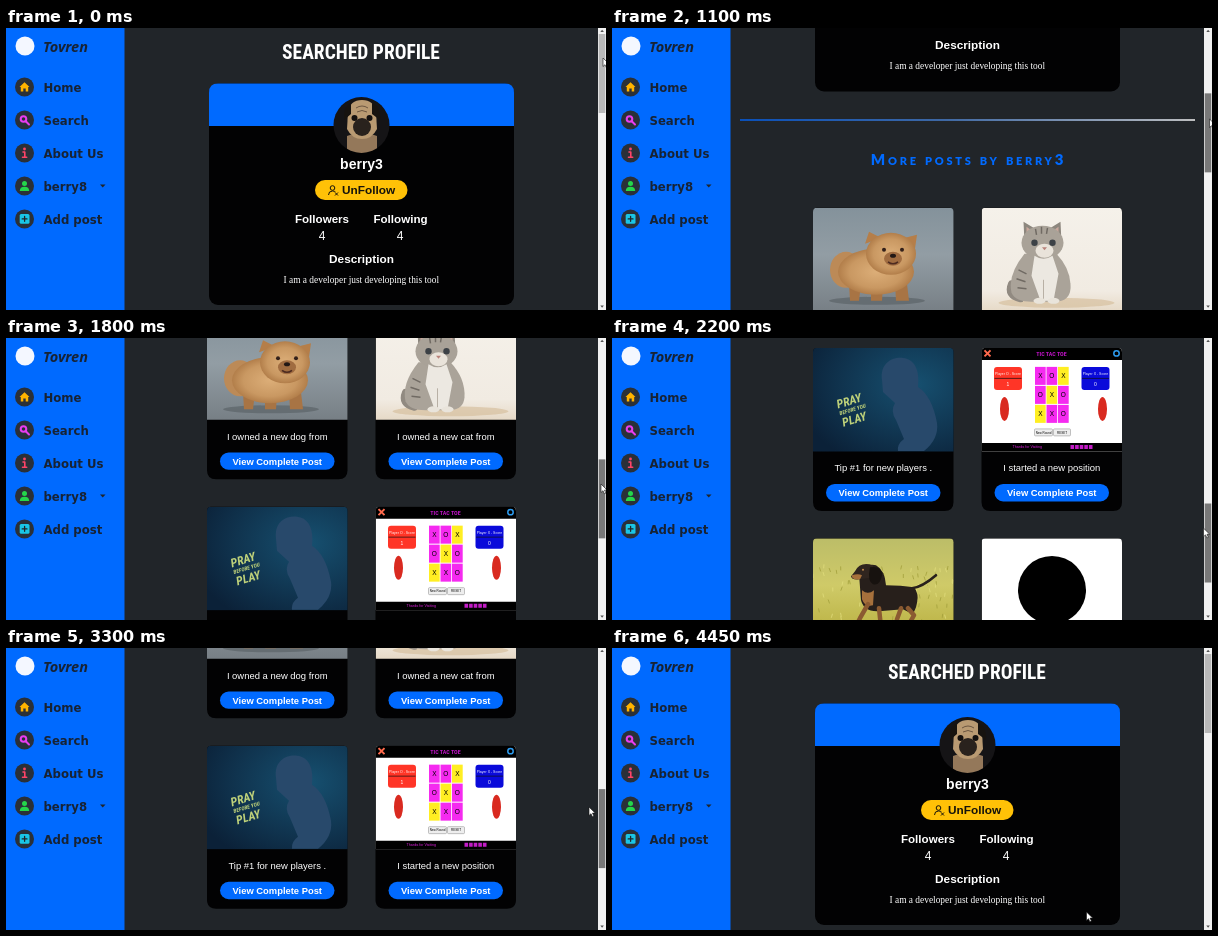
Write an HTML page that moves like this. It is 600x282 px and loops after 4.5 s.

```html
<!DOCTYPE html>
<html lang="en">
<head>
<meta charset="utf-8">
<title>Searched profile</title>
<style>
html, body { margin: 0; width: 100%; height: 100%; overflow: hidden; background: #212529; }
svg { display: block; width: 100%; height: 100%; }
text { font-family: "Liberation Sans", Arial, sans-serif; }
.mid { text-anchor: middle; }
.b { font-weight: 700; }
.brand { font: italic 700 14.5px "Open Sans", sans-serif; }
.nav { font: 700 11.7px "DejaVu Sans", Verdana, sans-serif; }
.title { font: 700 19.5px "Roboto Condensed", "Open Sans Condensed", Roboto, sans-serif; font-stretch: 75%; }
.bio { font: 9.4px "Liberation Serif", Times, serif; }
.more { font: 900 15px Lato, sans-serif; font-variant: small-caps; letter-spacing: 2.75px; }
.poster { font: italic 700 12px "Roboto Condensed", Roboto, sans-serif; font-stretch: 75%; }
</style>
</head>
<body>
<svg viewBox="0 0 600 282">
  <defs>
    <linearGradient id="rule"><stop stop-color="#0062f5"/><stop offset=".45" stop-color="#4b85d8"/><stop offset="1" stop-color="#fff"/></linearGradient>
    <linearGradient id="road" x2="0" y2="1"><stop stop-color="#84929b"/><stop offset=".45" stop-color="#929da4"/><stop offset="1" stop-color="#777f85"/></linearGradient>
    <linearGradient id="grass" x2="0" y2="1"><stop stop-color="#bcbd68"/><stop offset=".45" stop-color="#cfca68"/><stop offset="1" stop-color="#b6ad3c"/></linearGradient>
    <linearGradient id="paper" x2="0" y2="1"><stop stop-color="#f5f1ea"/><stop offset=".8" stop-color="#f1ebe2"/><stop offset="1" stop-color="#e6d9c6"/></linearGradient>
    <radialGradient id="night" cx=".72" cy=".35" r=".85"><stop stop-color="#165070"/><stop offset=".6" stop-color="#10344f"/><stop offset="1" stop-color="#0b2138"/></radialGradient>
    <radialGradient id="fur"><stop stop-color="#dcae78"/><stop offset=".7" stop-color="#c99862"/><stop offset="1" stop-color="#b27e4a"/></radialGradient>
    <clipPath id="round"><circle cx="355.5" cy="97" r="28"/></clipPath>
    <clipPath id="photo"><path d="M0 103.5V4Q0 0 4 0H136.5Q140.5 0 140.5 4V103.5Z"/></clipPath>

    <g id="pom">
      <path fill="url(#road)" d="M0 0h141v104H0z"/>
      <ellipse cx="64" cy="93" rx="48" ry="4" fill="#5c6468" opacity=".7"/>
      <path fill="#a87444" d="M36 76h12l-2 17h-9zM58 78h12l-1 15H58zM82 76h12l2 17H83z"/>
      <ellipse cx="33" cy="62" rx="16" ry="18" fill="#bc8a57"/>
      <ellipse cx="63" cy="64" rx="38" ry="23" fill="url(#fur)"/>
      <path fill="#b57e49" d="M52 36l4-12 12 6zM92 30l12-3-2 14z"/>
      <ellipse cx="78" cy="46" rx="25" ry="21" fill="url(#fur)"/>
      <ellipse cx="80" cy="51" rx="9" ry="7" fill="#a06c40"/>
      <ellipse cx="80" cy="48" rx="3" ry="2" fill="#221815"/>
      <path d="M75 54q5 4 10 0" fill="none" stroke="#4d2b20" stroke-width="1.6"/>
      <circle cx="71" cy="42" r="2" fill="#33201a"/><circle cx="89" cy="42" r="2" fill="#33201a"/>
    </g>

    <g id="kitten">
      <path fill="url(#paper)" d="M0 0h141v104H0z"/>
      <ellipse cx="75" cy="95" rx="58" ry="5" fill="#d7c0a0" opacity=".7"/>
      <path d="M39 91q-14-3-9-15" fill="none" stroke="#918a81" stroke-width="7" stroke-linecap="round"/>
      <path fill="#aaa399" d="M43 46q-17 21-13 39 4 9 20 9h25q13-1 14-13 1-19-14-35z"/>
      <path fill="#8d877e" d="M43 35l-1-21 15 9zM66 22l13-8 1 21z"/>
      <path fill="#c9a79c" d="M45 29v-10l8 6zM70 24l7-5v10z"/>
      <ellipse cx="61" cy="35" rx="21" ry="17" fill="#a9a298"/>
      <path fill="#ece8e1" d="M53 48q9 6 18 0l6 18-5 27H59l-9-25z"/>
      <ellipse cx="63" cy="43" rx="9" ry="7" fill="#e9e3da"/>
      <path d="M54 21l1 6M60 19v7M66 20l-1 6M37 62l8 4M35 71l9 3M36 80l9 1" fill="none" stroke="#706a63" stroke-width="1.5"/>
      <circle cx="53" cy="35" r="3.2" fill="#3c4146"/><circle cx="71" cy="35" r="3.2" fill="#3c4146"/>
      <path fill="#b9837b" d="M60.500 39.500h5l-2.500 3z"/>
      <path d="M62 72v20" stroke="#b8b0a5"/>
      <ellipse cx="58" cy="93" rx="6" ry="3" fill="#e9e4db"/><ellipse cx="72" cy="93" rx="6" ry="3" fill="#e9e4db"/>
    </g>

    <g id="pray">
      <path fill="url(#night)" d="M0 0h141v104H0z"/>
      <path fill="#28496b" d="M69 32C67 16 78 9 90 10S107 23 105 39Q119 48 124 75Q126 91 111 103H85Q84 96 91 91L83 72Q77 63 82 55L70 44Z"/>
      <g fill="#bfd27a" transform="rotate(-17 38 62)">
        <text class="poster" x="26" y="57" font-size="12">PRAY</text>
        <text class="poster" x="26" y="64" style="font-size:5.5px">BEFORE YOU</text>
        <text class="poster" x="26" y="76">PLAY</text>
      </g>
    </g>

    <g id="game">
      <path fill="#fff" d="M0 0h141v104H0z"/>
      <path d="M0 0h141v12H0zM0 95h141v9H0z"/>
      <path d="M3 2.500l6 6m0-6l-6 6" stroke="#ff6a4d" stroke-width="2"/>
      <circle cx="135" cy="5.500" r="2.700" fill="none" stroke="#2d9cf0" stroke-width="1.500"/>
      <text class="mid b" x="70" y="8.500" font-size="6" fill="#c213c9" style="font-family:'Roboto Condensed',Roboto,sans-serif;font-stretch:75%">TIC TAC TOE</text>
      <g id="board"></g>
      <rect x="12.500" y="19" width="28" height="23" rx="3" fill="#ff3527"/>
      <rect x="100" y="19" width="28" height="23" rx="3" fill="#0a0ada"/>
      <path d="M13 30.500h27M100.500 30.500h27" stroke="#111" stroke-width=".7"/>
      <g class="mid" fill="#fff" font-size="3.500">
        <text x="26.500" y="27">Player O - Score</text><text x="114" y="27">Player X - Score</text>
        <text x="26.500" y="38" font-size="5">1</text><text x="114" y="38" font-size="5">0</text>
      </g>
      <ellipse cx="23" cy="61" rx="4.500" ry="12" fill="#d92a20"/>
      <ellipse cx="121" cy="61" rx="4.500" ry="12" fill="#d92a20"/>
      <g fill="#eee" stroke="#888" stroke-width=".5"><rect x="53" y="81" width="18" height="7" rx="1"/><rect x="72" y="81" width="17" height="7" rx="1"/></g>
      <g class="mid" font-size="3"><text x="62" y="85.700">New Round</text><text x="80.500" y="85.700">RESET</text></g>
      <text x="31" y="100.500" font-size="3.600" fill="#e01fe0">Thanks for Visiting</text>
      <path d="M89 99h22" stroke="#c21cc6" stroke-width="4" stroke-dasharray="3.600 1"/>
    </g>

    <g id="hound">
      <path fill="url(#grass)" d="M0 0h141v104H0z"/>
      <g id="blades"></g>
      <path d="M99 50Q109 49 123 37" fill="none" stroke="#29211c" stroke-width="2.600" stroke-linecap="round"/>
      <path fill="#271f1b" d="M46 36q8-12 17-9 9 5 10 20 15 0 28 2 6 7 2 20l-3 7-10-5-24 2q-15 1-18-11z"/>
      <path fill="#30251f" d="M60 27q-13-4-18 6l-4 5q1 4 8 3l14-2z"/>
      <path fill="#17120f" d="M57 29q12-2 12 8-2 11-9 9-6-3-3-17z"/>
      <path fill="#a7713c" d="M39 37q6-2 10 0l-2 4q-6 1-8-2zM49 52q6 5 12 0l-1 15q-8 2-11-6z"/>
      <path d="M55 66l-8 14-4 8M66 70l2 19M95 70l6 7-5 9M88 70l-4 11" fill="none" stroke="#8b5a31" stroke-width="4.500" stroke-linecap="round" stroke-linejoin="round"/>
      <circle cx="50" cy="31.500" r="1" fill="#c28b4e"/>
    </g>

    <g id="dot">
      <path fill="#fff" d="M0 0h141v104H0z"/>
      <circle cx="70.500" cy="51.800" r="34"/>
    </g>
  </defs>

  <rect width="600" height="282" fill="#212529"/>
  <g id="page">
    <text class="mid title" x="355" y="30.500" fill="#fff">SEARCHED PROFILE</text>
    <rect x="203" y="55.500" width="305" height="221.500" rx="9" fill="#020203"/>
    <path fill="#006aff" d="M203 98V64.500Q203 55.500 212 55.500H499Q508 55.500 508 64.500V98Z"/>
    <g clip-path="url(#round)">
      <rect x="327" y="69" width="57" height="57" fill="#151416"/>
      <path fill="#94785a" d="M341 127V108q15-7 30 0v19z"/>
      <path fill="#b99a72" d="M342 84q2-12 14-12t14 12l1 17q-5 10-15 10t-15-10z"/>
      <path fill="#17130f" d="M345 75q-8 3-7 17l7-6zM366 75q9 3 8 17l-8-6z"/>
      <ellipse cx="356" cy="99" rx="9" ry="9" fill="#29221d"/>
      <circle cx="348.500" cy="90" r="3" fill="#14100e"/><circle cx="363.500" cy="90" r="3" fill="#14100e"/>
      <path d="M350 80q6-4 12 0M351 84q5-3 10 0" fill="none" stroke="#6c5640"/>
    </g>
    <g fill="#fff">
      <text class="mid b" x="355.500" y="141" font-size="14">berry3</text>
      <text class="mid b" x="316" y="194.500" font-size="11.600">Followers</text>
      <text class="mid b" x="394.500" y="194.500" font-size="11.600">Following</text>
      <text class="mid" x="316" y="212" font-size="12">4</text>
      <text class="mid" x="394" y="212" font-size="12">4</text>
      <text class="mid b" x="355.500" y="234.500" font-size="11.800">Description</text>
      <text class="mid bio" x="355.300" y="254.500">I am a developer just developing this tool</text>
    </g>
    <rect x="309" y="152" width="92.500" height="20" rx="10" fill="#ffc107"/>
    <g fill="none" stroke="#15130c"><circle cx="326.500" cy="160" r="2.300"/><path d="M322.500 167q0-4 4-4 2 0 3 1M329 164.500l3 3m0-3l-3 3"/></g>
    <text class="b" x="336" y="166.300" font-size="11.800" fill="#15130c">UnFollow</text>
    <rect x="128" y="304.800" width="455" height="1.400" fill="url(#rule)"/>
    <text class="mid more" x="356.500" y="350" fill="#006aff">More posts by berry3</text>
    <g id="posts"></g>
  </g>

  <rect width="118.500" height="282" fill="#006aff"/>
  <circle cx="19" cy="18" r="9.500" fill="#f4f7ff"/>
  <text class="brand" x="37" y="24" fill="#172334">Tovren</text>
  <g id="menu"></g>
  <path fill="#212529" d="M94 156.500h5.500l-2.750 3z"/>
  <g fill="none" stroke-linecap="round" stroke-linejoin="round">
    <path fill="#ffb300" d="M13.500 59l5-4.700 5 4.700h-1.300v4.500h-2.500v-3h-2.400v3h-2.500V59z"/>
    <circle cx="17.500" cy="91" r="2.800" stroke="#e83df0" stroke-width="2"/><path d="M20 93.500l3 3" stroke="#e83df0" stroke-width="2"/>
    <circle cx="18.500" cy="121" r="1.400" fill="#ff4468"/><path d="M17 124h1.800v5M16.500 129.300h4.200" stroke="#ff4468" stroke-width="1.600"/>
    <circle cx="18.500" cy="155.500" r="2.500" fill="#24d64b"/><path fill="#24d64b" d="M13.800 163q0-4.300 4.700-4.300t4.700 4.300z"/>
    <rect x="13.700" y="186" width="9.800" height="9.800" rx="1.500" fill="#19c5e6"/><path d="M18.600 188.500v4.800M16.200 190.900H21" stroke="#212529" stroke-width="1.300"/>
  </g>

  <rect x="592" width="8" height="282" fill="#f1f1f1"/>
  <path fill="#555" d="M594.300 4h3.600l-1.800-2.200zM594.300 277.500h3.600l-1.800 2.200z"/>
  <rect id="thumb" x="592.700" width="6.600" height="79"/>
  <path id="cursor" d="M0 0v8.500l2-1.800 1.400 3.100 1.500-.7-1.400-3h2.700z" fill="#fff" stroke="#111" stroke-width=".6"/>
</svg>
<script>
const LOOP = 4500, STEP = 50;
const $ = id => document.getElementById(id);

$('menu').innerHTML = ['Home', 'Search', 'About Us', 'berry8', 'Add post'].map((label, i) => {
  const y = 59 + i * 33;
  return `<circle cx="18.500" cy="${y}" r="9.500" fill="#2a3038"/>
    <text class="nav" x="37.500" y="${y + 4.5}" fill="#172334">${label}</text>`;
}).join('');

$('board').innerHTML = [...'XOXOXOXXO'].map((mark, i) => {
  const col = i % 3, row = (i - col) / 3;
  const x = 53.5 + col * 11.5, y = 19 + row * 19;
  return `<rect x="${x}" y="${y}" width="10.700" height="18" fill="${col + row === 2 ? '#ffee22' : '#f52af0'}"/>
    <text class="mid" x="${x + 5.3}" y="${y + 11.5}" font-size="6.500">${mark}</text>`;
}).join('');

let seed = 7;
const rand = () => (seed = seed * 16807 % 2147483647) / 2147483647;
$('blades').innerHTML = Array.from({ length: 110 }, () => {
  const x = rand() * 140, y = 30 + rand() * 72;
  return `<path d="M${x} ${y}l${rand() * 3 - 1.5} -4" stroke="${rand() < .5 ? '#e0dc7c' : '#a3a03c'}" stroke-width=".8"/>`;
}).join('');

const posts = [
  ['pom', 'I owned a new dog from'], ['kitten', 'I owned a new cat from'],
  ['pray', 'Tip #1 for new players .'], ['game', 'I started a new position'],
  ['hound', 'Dog Found'], ['dot', 'Learning Qubrel and I']
];
$('posts').innerHTML = posts.map(([art, caption], i) => {
  const x = i % 2 ? 369.5 : 201, y = 393.3 + (i >> 1) * 190.35;
  return `<g transform="translate(${x} ${y})">
    <path fill="#020203" d="M0 4Q0 0 4 0H136.500Q140.500 0 140.500 4V154Q140.500 163 131.500 163H9Q0 163 0 154Z"/>
    <g clip-path="url(#photo)"><use href="#${art}"/></g>
    <text class="mid" x="70.250" y="123.400" font-size="9.450" fill="#fff">${caption}</text>
    <rect x="13" y="136.200" width="114.500" height="17.300" rx="8.650" fill="#006aff"/>
    <text class="mid b" x="70.250" y="148.300" font-size="9.400" fill="#fff">View Complete Post</text>
  </g>`;
}).join('');

// time, scroll offset, pointer x, pointer y
const keys = [
  [0, 0, 597, 30], [400, 0, 597, 30], [600, 20, 597, 37], [1100, 213.5, 597.5, 91],
  [1800, 415, 595, 146], [2600, 676, 589, 219], [2850, 679, 589, 220], [3300, 486, 583, 159],
  [3600, 242, 580, 89], [3950, 0, 578, 25], [4100, 0, 560, 70], [4400, 0, 474.5, 264], [4500, 0, 474.5, 264]
];

const slope = (i, c) => (keys[i + 1][c] - keys[i][c]) / (keys[i + 1][0] - keys[i][0]);

// Harmonic-mean tangents keep the curve free of overshoot.
function tangent(i, c) {
  if (i === 0 || i === keys.length - 1) return 0;
  const a = slope(i - 1, c), b = slope(i, c);
  return a * b > 0 ? 2 * a * b / (a + b) : 0;
}

function sample(t, c) {
  let i = 0;
  while (i < keys.length - 2 && t >= keys[i + 1][0]) i++;
  const h = keys[i + 1][0] - keys[i][0], u = (t - keys[i][0]) / h;
  const ease = u * u * (3 - 2 * u);
  return keys[i][c] + (keys[i + 1][c] - keys[i][c]) * ease
    + h * u * (1 - u) * ((1 - u) * tangent(i, c) - u * tangent(i + 1, c));
}

function draw(now) {
  const t = Math.floor(now % LOOP / STEP) * STEP;
  const scroll = sample(t, 1);
  $('page').setAttribute('transform', `translate(0 ${-scroll})`);
  $('thumb').setAttribute('y', 6 + scroll * .278);
  $('thumb').setAttribute('fill', t >= 300 && t < 4000 ? '#787878' : '#b8b8b8');
  $('cursor').setAttribute('transform', `translate(${sample(t, 2)} ${sample(t, 3)})`);
}

const start = performance.now();
function frame() {
  draw(performance.now() - start);
  requestAnimationFrame(frame);
}
frame();
</script>
</body>
</html>
```
